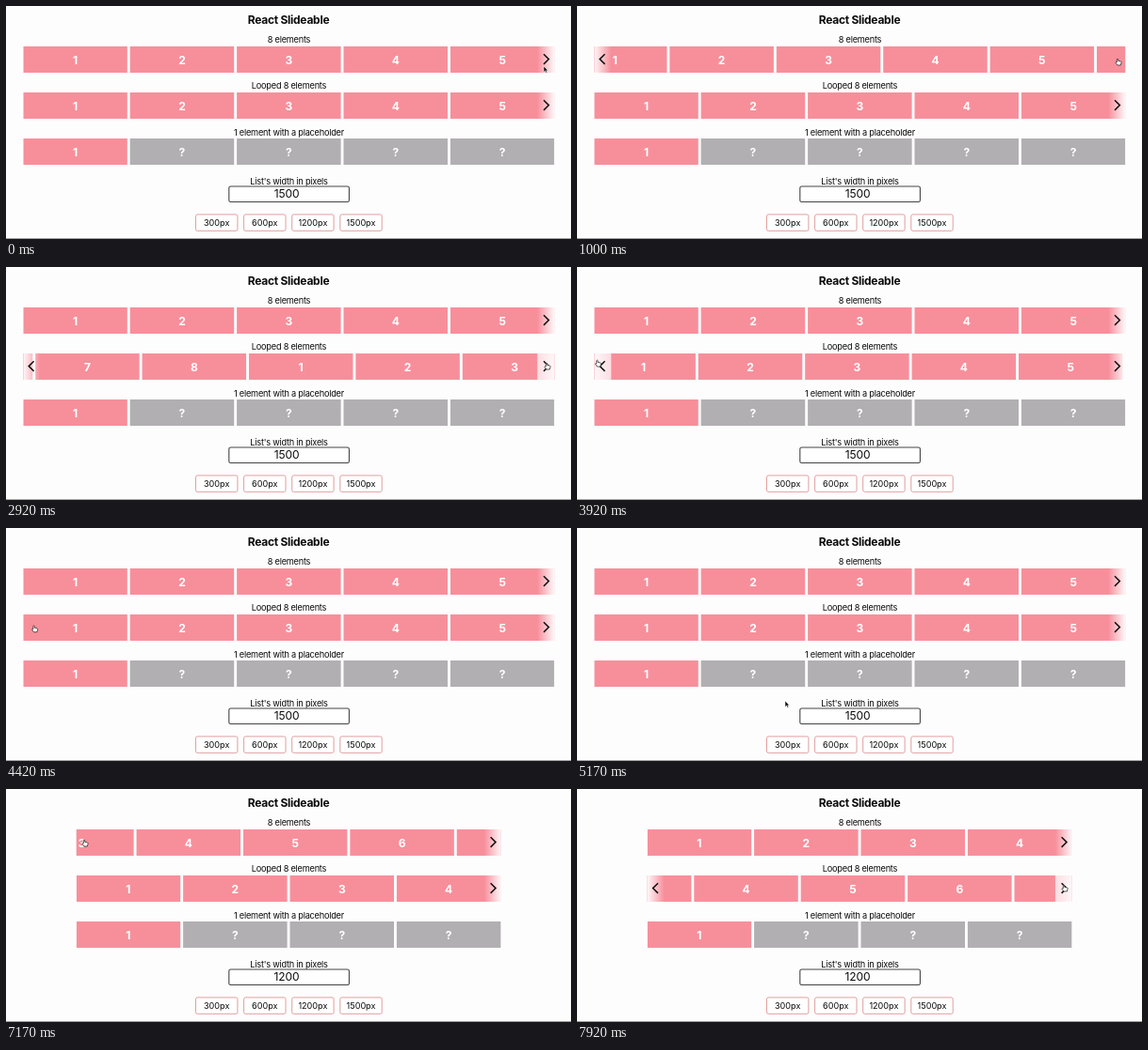
These frames come from a looping animation (600x248 px, 8000 ms). An HTML page:

```html
<!DOCTYPE html>
<html lang="en">
<head>
<meta charset="utf-8">
<title>React Slideable</title>
<style>
  html, body { margin: 0; width: 100%; height: 100%; overflow: hidden; background: #fefdfe; }
  #stage { display: block; width: 600px; height: 248px; font-family: Inter, "Open Sans", sans-serif; }
  text { text-anchor: middle; fill: #0a0a0a; }
  .title { font-size: 12px; font-weight: 700; letter-spacing: -.25px; }
  .label { font-size: 9.2px; letter-spacing: -.23px; }
  .tile text { font-size: 12px; font-weight: 700; fill: #fff; }
  .pink { fill: #f78f9b; }
  .grey { fill: #b1afb1; }
  .value { font-size: 12px; letter-spacing: -.1px; }
  .size { font-size: 9.1px; }
  .size-box { fill: #fff; stroke: #d98787; stroke-width: .8; }
  .chevron { fill: none; stroke: #111; stroke-width: 1.5; }
</style>
</head>
<body>
<svg id="stage" viewBox="0 0 600 248">
  <defs>
    <linearGradient id="fade">
      <stop offset="0" stop-color="#fefdfe" stop-opacity="0"/>
      <stop offset="1" stop-color="#fefdfe" stop-opacity=".95"/>
    </linearGradient>
    <linearGradient id="fadeHover">
      <stop offset="0" stop-color="#fefdfe" stop-opacity=".7"/>
      <stop offset="1" stop-color="#fefdfe" stop-opacity=".95"/>
    </linearGradient>
  </defs>
  <rect width="600" height="248" fill="#fefdfe"/>
  <rect y="247" width="600" height="1" fill="#a3a2a3"/>
  <text class="title" x="300" y="19">React Slideable</text>
  <text class="label" x="300.5" y="39">8 elements</text>
  <text class="label" x="300.5" y="88.3">Looped 8 elements</text>
  <text class="label" x="300.5" y="137.5">1 element with a placeholder</text>
  <text class="label" x="300.5" y="190">List's width in pixels</text>
  <g id="rows"></g>
  <rect x="236.8" y="192" width="127.6" height="16.5" rx="1.8" fill="#fff" stroke="#444" stroke-width="1.1"/>
  <text id="value" class="value" x="298" y="204.3"></text>
  <g id="sizes"></g>
  <g id="cursor">
    <path id="arrow" d="M0 0V6.4L1.5 5.1 2.6 7.3 3.7 6.8 2.7 4.7H4.6Z" fill="#111" stroke="#fff" stroke-width=".5"/>
    <path id="hand" d="M-.7 .6Q0-.3 .7 .6V2.3L3.5 3Q4.3 3.3 4 4.5L3.3 7H0L-2 4.4Q-2.2 3.4-.7 4Z" fill="#fff" stroke="#222" stroke-width=".75"/>
  </g>
</svg>
<script>
const LOOP = 8000, PITCH = 113.4, TILE = 110.5, HEIGHT = 28, BUTTON = 18;
const SLIDE = 500, RESIZE_AT = 5500;
const byId = id => document.getElementById(id);

function add(parent, tag, attrs = {}, content) {
  const node = document.createElementNS('http://www.w3.org/2000/svg', tag);
  for (const key in attrs) node.setAttribute(key, attrs[key]);
  if (content !== undefined) node.textContent = content;
  return parent.appendChild(node);
}

function arrowButton(parent, flip) {
  const group = add(parent, 'g');
  const inner = add(group, 'g', flip ? { transform: `translate(${BUTTON}) scale(-1 1)` } : {});
  const shade = add(inner, 'rect', { width: BUTTON, height: HEIGHT });
  add(inner, 'path', { class: 'chevron', d: 'M6.7 8.3 12.1 13.6 6.7 18.9' });
  return { group, shade };
}

function makeRow(y, count, label, grey) {
  const view = add(byId('rows'), 'svg', { y, height: HEIGHT, overflow: 'hidden' });
  const strip = add(view, 'g');
  for (let i = 0; i < count; i++) {
    const tile = add(strip, 'g', { class: 'tile', transform: `translate(${i * PITCH})` });
    add(tile, 'rect', { class: grey(i) ? 'grey' : 'pink', width: TILE, height: HEIGHT });
    add(tile, 'text', { x: TILE / 2, y: 18.5 }, label(i));
  }
  return { y, view, strip };
}

const number = i => i % 8 + 1;
const plain = makeRow(43, 8, number, () => false);
const looped = makeRow(92, 16, number, () => false);
const single = makeRow(141, 5, i => i ? '?' : 1, i => i > 0);
for (const row of [plain, looped]) {
  row.left = arrowButton(row.view, true);
  row.right = arrowButton(row.view, false);
}

// Slides: start time and target index
plain.slides = [[950, 3], [1480, 0], [6550, 4], [7050, 0]];
looped.slides = [[2300, 5], [2848, 10], [3455, 0], [7735, 4]];
// Spans in which each arrow is shown or missing
plain.leftShown = [[950, 1480], [6550, 7050]];
plain.rightHidden = plain.leftShown;
looped.leftShown = [[2300, 4400], [7735, LOOP]];
looped.rightHidden = [];

[300, 600, 1200, 1500].forEach((px, i) => {
  const x = 201.5 + i * 51.1;
  add(byId('sizes'), 'rect', { class: 'size-box', x, y: 221.9, width: 44.4, height: 17.4, rx: 1.8 });
  add(byId('sizes'), 'text', { class: 'size', x: x + 22.2, y: 233.6 }, px + 'px');
});

// Pointer path: time, x, y
const path = [
  [0, 571, 64], [80, 571, 64], [450, 574, 56], [1000, 574, 56], [1400, 29, 52],
  [1600, 29, 50], [1830, 32, 46], [1900, 32, 46], [2250, 575, 102], [2950, 574, 102],
  [3050, 574, 102], [3420, 22, 99], [4330, 21, 99], [4750, 92, 139], [5170, 221, 184],
  [5420, 325, 229], [5750, 325, 229], [6180, 522, 64], [6600, 520, 58], [6980, 83, 54],
  [7180, 83, 54], [7480, 552, 80], [7650, 517, 102], [LOOP, 517, 102]
];

const bezier = (a, b, u) => 3 * a * u * (1 - u) ** 2 + 3 * b * u * u * (1 - u) + u ** 3;
function ease(p) {
  if (p <= 0) return 0;
  if (p >= 1) return 1;
  let lo = 0, hi = 1;
  for (let i = 0; i < 18; i++) {
    const mid = (lo + hi) / 2;
    if (bezier(.25, .25, mid) < p) lo = mid; else hi = mid;
  }
  return bezier(.1, 1, lo);
}

const within = (spans, t) => spans.some(([from, to]) => t >= from && t < to);
const slideIndex = (slides, t) =>
  slides.reduce((at, [start, target]) => at + (target - at) * ease((t - start) / SLIDE), 0);

function pointer(t) {
  const i = Math.max(1, path.findIndex(key => key[0] > t));
  const [t0, x0, y0] = path[i - 1], [t1, x1, y1] = path[i];
  const p = (t - t0) / (t1 - t0), s = p * p * (3 - 2 * p);
  return [x0 + (x1 - x0) * s, y0 + (y1 - y0) * s];
}

function setButton(button, x, shown, hover) {
  button.group.setAttribute('transform', `translate(${x})`);
  button.group.style.display = shown ? '' : 'none';
  button.shade.setAttribute('fill', hover ? 'url(#fadeHover)' : 'url(#fade)');
}

function draw(t) {
  const px = t < RESIZE_AT ? 1500 : 1200;
  const width = px * .376, left = 300.3 - width / 2;
  const [cx, cy] = pointer(t);
  const over = (x, y, w, h) => t > 80 && cx >= x && cx <= x + w && cy >= y && cy <= y + h;
  let hand = over(201, 222, 45, 17) || over(303, 222, 45, 17);

  for (const row of [plain, looped, single]) {
    row.view.setAttribute('x', left);
    row.view.setAttribute('width', width);
    if (!row.slides) continue;
    row.strip.setAttribute('transform', `translate(${-PITCH * slideIndex(row.slides, t)})`);
    const onLeft = over(left, row.y, BUTTON, HEIGHT);
    const onRight = over(left + width - BUTTON, row.y, BUTTON, HEIGHT);
    setButton(row.left, 0, within(row.leftShown, t), onLeft);
    setButton(row.right, width - BUTTON, !within(row.rightHidden, t), onRight);
    hand = hand || onLeft || onRight;
  }

  byId('value').textContent = px;
  byId('cursor').setAttribute('transform', `translate(${cx} ${cy})`);
  byId('arrow').style.display = hand ? 'none' : '';
  byId('hand').style.display = hand ? '' : 'none';
}

const begin = performance.now();
function tick() {
  draw((performance.now() - begin) % LOOP);
  requestAnimationFrame(tick);
}
tick();
</script>
</body>
</html>
```
